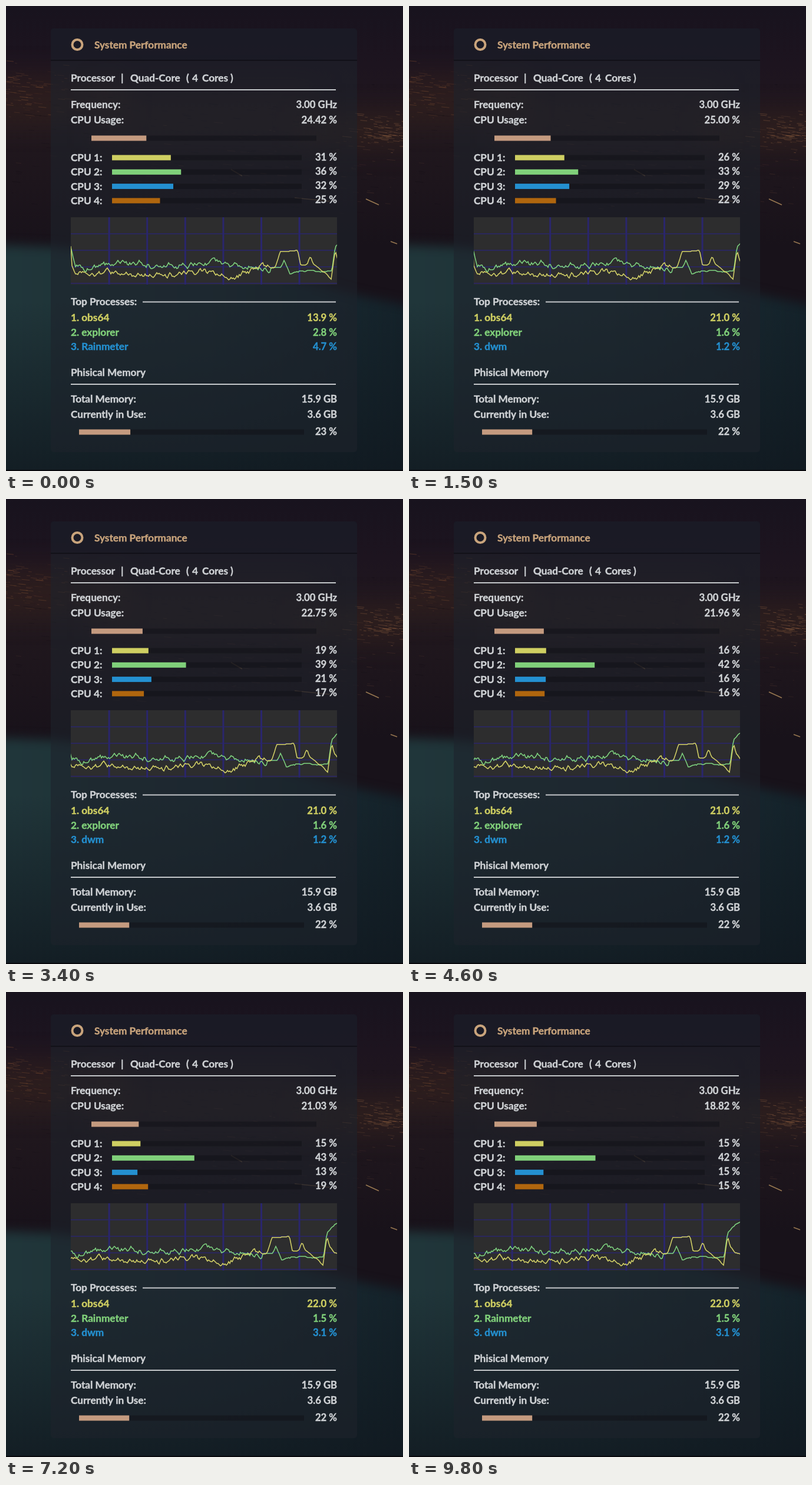
An HTML page with a canvas for the animation above (9900 ms loop, 674x788 px).

```html
<!DOCTYPE html>
<html>
<head>
<meta charset="utf-8">
<style>
  html, body { margin: 0; width: 100%; height: 100%; overflow: hidden; background: #17121a; }
  canvas { display: block; filter: blur(.4px); }
</style>
</head>
<body>
<canvas id="stage" width="674" height="788"></canvas>
<script>
const W = 674, H = 788, LOOP = 9900, SECOND = 1000;
const c = document.getElementById('stage').getContext('2d');
const backdrop = document.createElement('canvas');
backdrop.width = W;
backdrop.height = H;

const WHITE = '#cfd2d5', TAN = '#c9a47c', SKIN = '#c49a7f';
const COLORS = ['#cfcf62', '#80d07a', '#2490d0', '#b0660e'];

// key readings, eased linearly between these seconds
const keySeconds = [0, 1, 2, 4, 6, 7, 9];
const usage = [24.42, 25, 23.53, 21.96, 25.48, 21.03, 18.82];
const cores = [
  [31, 26, 22, 16.4, 18, 15, 15],
  [36.4, 33.3, 36, 42, 43.4, 43.4, 42.4],
  [32.3, 28.6, 25.3, 16.2, 12, 13.4, 15],
  [25.3, 21.6, 18, 15.6, 19.3, 19, 15]
];
// the process list refreshes every five seconds
const processes = [
  ['obs64 13.9', 'explorer 2.8', 'Rainmeter 4.7'],
  ['obs64 21.0', 'explorer 1.6', 'dwm 1.2'],
  ['obs64 22.0', 'Rainmeter 1.5', 'dwm 3.1']
];

function seeded(seed) {
  return () => (seed = (seed * 16807) % 2147483647) / 2147483647;
}

function lerpKeys(xs, ys, x) {
  let i = 0;
  while (i < xs.length - 2 && xs[i + 1] < x) i++;
  return ys[i] + (ys[i + 1] - ys[i]) * (x - xs[i]) / (xs[i + 1] - xs[i]);
}

// random wobble around a few turning points, calmer near the recent peaks
function trace(keys, seed) {
  const rnd = seeded(seed), xs = keys.map(k => k[0]), ys = keys.map(k => k[1]);
  const points = [];
  for (let x = 110, drift = 0; x <= 582; x += 2) {
    drift = drift * 0.8 + (rnd() - 0.5) * 8;
    const wobble = x > 118 && x < 450 ? drift : drift * 0.2;
    points.push([x, Math.round(lerpKeys(xs, ys, x) + wobble)]);
  }
  return points;
}

const yellowTrace = trace([[110, 408], [112, 440], [118, 453], [400, 453], [430, 444], [457, 443],
  [466, 416], [495, 413], [500, 438], [511, 438], [517, 424], [522, 437], [545, 454], [552, 463],
  [559, 414], [563, 431], [570, 442], [582, 446]], 311);
const greenTrace = trace([[110, 410], [118, 444], [230, 437], [370, 438], [420, 443], [467, 444],
  [472, 431], [482, 454], [500, 449], [553, 450], [559, 408], [575, 391], [582, 389]], 77);

function paintBackdrop() {
  const b = backdrop.getContext('2d'), rnd = seeded(4211);
  const wash = (x0, y0, x1, y1, stops) => {
    const g = b.createLinearGradient(x0, y0, x1, y1);
    stops.forEach((color, i) => g.addColorStop(i / (stops.length - 1), color));
    return g;
  };
  const fill = style => {
    b.fillStyle = style;
    b.fillRect(0, 0, W, H);
  };
  const line = (x0, y0, x1, y1) => {
    b.beginPath();
    b.moveTo(x0, y0);
    b.lineTo(x1, y1);
    b.stroke();
  };
  // a cluster of thin, nearly level streaks
  const streaks = (n, cx, cy, rx, ry, color, alpha) => {
    const spread = () => rnd() + rnd() + rnd() - 1.5;
    b.strokeStyle = color;
    for (let i = 0; i < n; i++) {
      const x = cx + spread() * rx, y = cy + spread() * ry, w = 2 + rnd() * 14;
      b.globalAlpha = rnd() * alpha;
      line(x, y, x + w, y + w * 0.1);
    }
    b.globalAlpha = 1;
  };

  fill(wash(0, 0, 0, 405, ['#18131e', '#1d141f', '#21181e', '#1d151c', '#18121a']));
  b.save();
  b.filter = 'blur(22px)';
  b.fillStyle = 'rgba(72,44,30,.32)';
  b.fillRect(-40, 115, 240, 85);
  b.fillRect(500, 180, 220, 60);
  b.fillStyle = 'rgba(66,46,40,.25)';
  b.fillRect(150, 130, 380, 110);
  b.restore();

  // water below a soft, slanted shore
  b.save();
  b.filter = 'blur(9px)';
  b.fillStyle = wash(0, 0, W, 0, ['#20363a', '#1d3036', '#14222a']);
  b.beginPath();
  [[-40, 404], [76, 408], [400, 440], [596, 490], [720, 515], [720, 830], [-40, 830]]
    .forEach(p => b.lineTo(...p));
  b.fill();
  b.restore();
  fill(wash(0, 500, 0, H, ['rgba(16,24,31,0)', 'rgba(16,24,31,.8)']));

  streaks(260, 300, 240, 420, 110, '#0e0a12', 0.35);
  streaks(150, 20, 145, 90, 45, '#a5663a', 0.35);
  streaks(130, 640, 213, 60, 28, '#b0764c', 0.4);
  streaks(160, 400, 270, 330, 70, '#8a5a42', 0.22);
  b.lineWidth = 1.6;
  b.strokeStyle = 'rgba(195,155,100,.75)';
  line(611, 327, 633, 337);
  line(653, 399, 664, 403);
  b.strokeStyle = 'rgba(165,125,80,.5)';
  line(382, 277, 401, 288);
  line(490, 325, 550, 331);

  b.fillStyle = 'rgba(30,36,44,.58)';
  b.beginPath();
  b.roundRect(76, 38, 520, 718, 5);
  b.fill();
  b.fillStyle = 'rgba(20,23,32,.25)';
  b.fillRect(76, 38, 520, 54);
  b.fillStyle = 'rgba(10,10,15,.6)';
  b.fillRect(76, 91, 520, 2);
  b.fillStyle = '#08090d';
  b.fillRect(0, 786, W, 2);
}

function text(s, x, y, color = WHITE, align = 'left') {
  c.font = `bold ${align === 'left' ? 17.2 : 16.7}px Lato, Carlito, sans-serif`;
  c.textAlign = align;
  c.fillStyle = c.strokeStyle = color;
  c.lineWidth = 0.4;
  c.fillText(s, x, y);
  c.strokeText(s, x, y);
}

function row(label, value, y, color) {
  text(label, 110, y, color);
  text(value, 562, y, color, 'right');
}

function bar(x, y, w, percent, color) {
  c.fillStyle = 'rgba(16,16,22,.5)';
  c.fillRect(x, y, w, 9);
  c.fillStyle = color;
  c.fillRect(x, y, w * percent / 100, 9);
}

function rule(x, y) {
  c.fillStyle = '#c3c6c9';
  c.fillRect(x, y, 560 - x, 2);
}

function plot(points, shift, color) {
  c.strokeStyle = color;
  c.beginPath();
  points.forEach(([x, y]) => c.lineTo(x - shift, y));
  c.stroke();
}

function graph(sec) {
  c.save();
  c.beginPath();
  c.rect(110, 358, 452, 114);
  c.clip();
  c.fillStyle = '#2d2d2e';
  c.fillRect(110, 358, 452, 114);
  c.fillStyle = '#2a275c';
  for (let y = 385; y < 472; y += 28) c.fillRect(110, y, 452, 2);
  c.fillStyle = '#2a266c';
  for (let i = 1; i < 7; i++) c.fillRect(109 + i * 64.6, 358, 3, 114);
  c.lineWidth = 1.5;
  plot(greenTrace, sec * 2, '#7fd480');
  plot(yellowTrace, sec * 2, '#d6d468');
  c.restore();
}

function draw(ms) {
  const sec = Math.floor(ms / SECOND);
  const read = values => lerpKeys(keySeconds, values, sec);
  const refresh = Math.floor((sec + 4) / 5);

  c.drawImage(backdrop, 0, 0);
  c.strokeStyle = TAN;
  c.lineWidth = 4;
  c.beginPath();
  c.arc(121, 65.5, 8.5, 0, Math.PI * 2);
  c.stroke();
  text('System Performance', 150, 72, TAN);

  [['Processor', 110], ['|', 195], ['Quad-Core', 211], ['(', 306], ['4', 316], ['Cores', 333], [')', 381]]
    .forEach(([s, x]) => text(s, x, 128));
  rule(110, 141);
  row('Frequency:', '3.00 GHz', 173);
  row('CPU Usage:', read(usage).toFixed(2) + ' %', 199);
  bar(145, 219.5, 382, read(usage), SKIN);

  cores.forEach((values, i) => {
    const y = 252.5 + i * 24.3, load = read(values);
    text(`CPU ${i + 1}:`, 110, y + 10.5);
    text(Math.round(load) + ' %', 562, y + 9, WHITE, 'right');
    bar(180, y, 322, load, COLORS[i]);
  });

  graph(sec);

  text('Top Processes:', 110, 507);
  rule(232, 500.5);
  processes[refresh].forEach((entry, i) => {
    const [name, load] = entry.split(' ');
    row(`${i + 1}. ${name}`, load + ' %', 534 + i * 24.5, COLORS[i]);
  });

  const memory = refresh ? 22.3 : 22.8;
  text('Phisical Memory', 110, 627);
  rule(110, 640);
  row('Total Memory:', '15.9 GB', 672);
  row('Currently in Use:', '3.6 GB', 698);
  bar(124, 717.5, 382, memory, SKIN);
  text(Math.round(memory) + ' %', 562, 727, WHITE, 'right');
}

paintBackdrop();
const start = performance.now();
(function tick() {
  draw((performance.now() - start) % LOOP);
  requestAnimationFrame(tick);
})();
</script>
</body>
</html>
```
